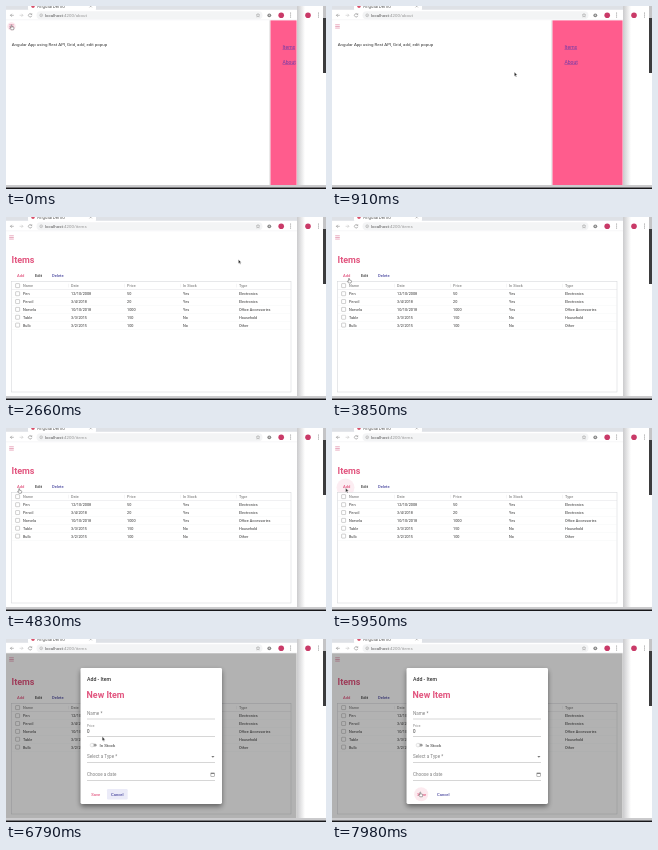
Write an HTML page that moves like this. It is 320 by 183 pixels and loops after 8000 ms.

```html
<!DOCTYPE html>
<html lang="en">
<head>
<meta charset="utf-8">
<title>Items grid</title>
<style>
html, body { margin: 0; width: 100%; height: 100%; overflow: hidden; background: #fff; }
svg { display: block; width: 100vw; height: 100vh; }
text { font-family: Roboto, "Liberation Sans", sans-serif; white-space: pre; }
</style>
</head>
<body>
<svg id="stage" viewBox="0 0 320 183" xmlns="http://www.w3.org/2000/svg"></svg>
<script>
const LOOP = 8000, STEP = 70;
const PINK = "#e2557f", INDIGO = "#4a489f", INK = "#333";

const rect = (x, y, w, h, fill, more = "") =>
  `<rect x="${x}" y="${y}" width="${w}" height="${h}" fill="${fill}" ${more}/>`;
const circle = (x, y, r, fill, more = "") =>
  `<circle cx="${x}" cy="${y}" r="${r}" fill="${fill}" ${more}/>`;
const path = (d, stroke, width = 0.6, more = "") =>
  `<path d="${d}" fill="none" stroke="${stroke}" stroke-width="${width}" ${more}/>`;
const text = (x, y, s, size, fill = INK, weight = 400, more = "") =>
  `<text x="${x}" y="${y}" font-size="${size}" fill="${fill}" font-weight="${weight}" ${more}>${s}</text>`;
const group = (id, body, more = "") => `<g id="${id}" ${more}>${body}</g>`;
const dots = x => [6.9, 9, 11.1].map(y => circle(x, y, 0.5, "#777")).join("");

function desktop() {
  return rect(0, 0, 320, 183, "#fff")
    + rect(291, 0, 8, 180, "url(#edge)")
    + circle(302, 9.3, 2.8, "#c93a68") + dots(312.5)
    + rect(317, 0, 3, 12, "#c4c4c6") + rect(317, 12, 3, 55, "#3b3b3d")
    + rect(0, 179, 320, 2.6, "#cbcbcd") + rect(0, 181.5, 320, 1.5, "#17171a");
}

function chrome() {
  return rect(0, 0, 291, 4, "#dee1e6") + rect(0, 3.8, 291, 10.4, "#fff")
    + rect(22, -3, 68, 8, "#fff", 'rx="2"')
    + circle(27, 0.2, 1.7, "#d8506a")
    + text(31, 1.6, "AngularDemo", 4.6, "#666")
    + path("M83.5 -1 l2.4 2.4 m0 -2.4 l-2.4 2.4", "#888", 0.5)
    + path("M7.8 9.3 H4.4 m1.5 -1.5 l-1.5 1.5 l1.5 1.5", "#777", 0.5)
    + path("M13.6 9.3 h3.4 m-1.5 -1.5 l1.5 1.5 l-1.5 1.5", "#bbb", 0.5)
    + path("M25.5 8.3 A1.7 1.7 0 1 0 25.8 9.7 M25.8 7.3 v1.2 h-1.3", "#777", 0.5)
    + rect(30.5, 5.2, 226, 8, "#f3f4f5", 'rx="4"')
    + circle(35.2, 9.3, 1.4, "none", 'stroke="#888" stroke-width=".4"')
    + path("M35.2 9 v1.1 M35.2 8.2 v.3", "#888", 0.4)
    + `<text x="39" y="10.9" font-size="4.4" fill="#555">localhost<tspan id="url" fill="#999"></tspan></text>`
    + path("M252 7.4 l.5 1.3 1.4 .1 -1.1 .9 .4 1.4 -1.2 -.8 -1.2 .8 .4 -1.4 -1.1 -.9 1.4 -.1 z", "#888", 0.4)
    + circle(263.3, 9.3, 1.9, "#888") + circle(263.3, 9.3, 0.7, "#ddd")
    + circle(275.2, 9.3, 2.8, "#c93a68") + dots(284.6)
    + rect(0, 13.8, 291, 0.4, "#e2e2e4");
}

function table() {
  const cols = [17, 65, 121, 177, 233];
  const rows = [
    "Pen|12/10/2008|50|Yes|Electronics",
    "Pencil|3/4/2018|20|Yes|Electronics",
    "Norvela|10/10/2018|1000|Yes|Office Accessories",
    "Table|3/3/2015|150|No|Household",
    "Bulb|3/2/2015|100|No|Other"
  ];
  const box = y => rect(9.6, y - 2, 4, 4, "#fff", 'rx=".5" stroke="#999" stroke-width=".45"');
  const line = (s, y, color, weight) => box(y)
    + s.split("|").map((c, i) => text(cols[i], y + 1.4, c, 3.8, color, weight)).join("");
  let out = rect(5.5, 64.5, 279.5, 110.5, "#fff", 'stroke="#d0d2d5" stroke-width=".5"')
    + line("Name|Date|Price|In Stock|Type", 68.6, "#888", 500)
    + rect(5.5, 72.5, 279.5, 0.4, "#d8dadd")
    + cols.slice(1).map(x => rect(x - 3, 66.8, 0.3, 3.6, "#dcdee1")).join("");
  rows.forEach((r, i) => {
    const y = 76.7 + i * 7.85;
    out += line(r, y, INK, 400) + rect(5.5, y + 3.9, 279.5, 0.25, "#ebecee");
  });
  return out;
}

function pages() {
  const home = text(5.7, 39.9, "Angular App using Rest API, Grid, add, edit popup", 4.4);
  const items = text(5.5, 46, "Items", 9, PINK, 700)
    + circle(13.5, 59.5, 9, PINK, 'id="addGlow"')
    + text(11, 60.4, "Add", 4.1, PINK, 500)
    + text(29, 60.4, "Edit", 4.1, INK, 500)
    + text(46, 60.4, "Delete", 4.1, INDIGO, 500)
    + table();
  const menu = [18.5, 20.1, 21.7].map(y => rect(3.2, y, 4.6, 0.7, "#e08aa6")).join("");
  return rect(0, 14.2, 291, 165, "#fff") + circle(5.5, 20.4, 4.2, PINK, 'id="menuGlow"')
    + menu + group("home", home) + group("items", items);
}

function sidebar() {
  const link = (y, s, w) => text(12, y, s, 5, "#6d3aa6") + rect(12, y + 0.6, w, 0.4, "#6d3aa6");
  return rect(-1.2, 14.2, 1.2, 165, "#000", 'opacity=".12"')
    + rect(0, 14.2, 71, 165, "#ff5c8d")
    + link(42.8, "Items", 12.6) + link(57.8, "About", 13);
}

function dialog() {
  const rule = y => rect(81, y, 128, 0.4, "#999");
  return rect(74.5, 31.5, 141.5, 136, "#000", 'rx="2" opacity=".45" filter="url(#soft)"')
    + rect(74.5, 29, 141.5, 136, "#fff", 'rx="1.4"')
    + text(81, 41.6, "Add - Item", 5.2, INK, 500)
    + text(80.6, 58.8, "New Item", 8.9, PINK, 700)
    + text(81, 76.1, "Name *", 4.6, "#808080")
    + text(81, 87.6, "Price", 3.3, "#808080")
    + text(81, 94.4, "0", 4.5)
    + [79.8, 97, 123, 141].map(rule).join("")
    + rect(85, 104.8, 5.6, 2.7, "#9b9b9b", 'rx="1.35"')
    + circle(86, 106.1, 1.9, "#fafafa", 'stroke="#bbb" stroke-width=".35"')
    + text(93.5, 107.7, "In Stock", 4.4)
    + text(81, 119.3, "Select a Type *", 4.6, "#808080")
    + `<path d="M205.3 117 h3.2 l-1.6 1.7 z" fill="#777"/>`
    + text(81, 137.1, "Choose a date", 4.6, "#808080")
    + rect(204.9, 134, 3.4, 3.6, "none", 'stroke="#777" stroke-width=".5"')
    + rect(204.9, 133.9, 3.4, 1, "#777")
    + circle(89.2, 155.2, 7, PINK, 'id="saveGlow"')
    + rect(101, 150, 20.7, 10.5, "#ebebf8", 'id="cancelGlow" rx="1.3"')
    + text(85.3, 156.8, "Save", 4.1, PINK, 500)
    + text(105, 156.8, "Cancel", 4.1, INDIGO, 500);
}

const arrow = `<path d="M0 0 V4.2 L1 3.4 L1.6 4.9 L2.4 4.5 L1.7 3.1 H3 Z" fill="#222" stroke="#fff" stroke-width=".4"/>`;
const hand = `<path d="M-.4 .3 Q0 -.3 .4 .3 V1.8 L2.1 2.2 Q2.6 2.5 2.5 3.1 L2 4.8 H-.4 L-1.6 3.1 Q-1.5 2.5 -.9 2.7 L-.4 3.1 Z" fill="#fff" stroke="#444" stroke-width=".45"/>`;

const stage = document.getElementById("stage");
stage.innerHTML = `<defs>
  <linearGradient id="edge"><stop stop-color="#cbcbcd"/><stop offset="1" stop-color="#fff"/></linearGradient>
  <filter id="soft" x="-20%" y="-20%" width="140%" height="140%"><feGaussianBlur stdDeviation="2.4"/></filter>
  <clipPath id="view"><rect y="14.2" width="290.6" height="164.8"/></clipPath></defs>`
  + desktop() + chrome()
  + group("page", pages() + group("side", sidebar())
    + group("status", rect(0, 173.5, 37, 6, "#e4e5e8", 'rx=".8"') + text(1.5, 177.9, "localhost:4200/items", 3.7, "#555"))
    + rect(0, 14, 291, 166, "#000", 'id="shade"') + group("dialog", dialog()), 'clip-path="url(#view)"')
  + group("cursor", group("arrow", arrow) + group("hand", hand));

const el = {};
stage.querySelectorAll("[id]").forEach(n => el[n.id] = n);

const clamp = v => Math.max(0, Math.min(1, v));
const span = (t, a, b) => clamp((t - a) / (b - a));
const show = (id, on) => el[id].setAttribute("display", on ? "inline" : "none");
const fade = (id, v) => el[id].setAttribute("opacity", v);
const move = (id, x, y) => el[id].setAttribute("transform", `translate(${x} ${y})`);

// cubic-bezier(.25, .8, .25, 1), solved by bisection
function swift(p) {
  let lo = 0, hi = 1;
  for (let i = 0; i < 18; i++) {
    const s = (lo + hi) / 2;
    if (0.75 * s * (1 - s) + s ** 3 < p) lo = s; else hi = s;
  }
  const r = 1 - lo;
  return 2.4 * lo * r * r + 3 * lo * lo * r + lo ** 3;
}

// time, x, y of the pointer tip
const trail = [
  [0, 5.5, 19], [630, 174.5, 66.5], [840, 174.5, 66.5], [910, 182.3, 66],
  [1330, 238.5, 57], [1400, 238.5, 57], [1890, 238, 42], [2310, 238, 42],
  [2800, 231, 42.5], [3150, 16, 61], [3500, 16, 61], [3850, 17, 61.2],
  [4200, 36, 61], [4340, 36, 61], [4900, 12.2, 60.4], [4970, 12.2, 60.4],
  [5180, 13.6, 60], [6090, 13.6, 60], [6510, 97, 81], [6720, 97, 81],
  [6790, 96.2, 97.6], [7560, 88, 151.5], [7700, 88.3, 153], [8000, 88.3, 153]
];

function pointer(t) {
  const i = trail.findIndex(k => k[0] > t);
  const [a, b] = [trail[i - 1], trail[i]];
  const p = span(t, a[0], b[0]), e = p * p * (3 - 2 * p);
  return [a[1] + (b[1] - a[1]) * e, a[2] + (b[2] - a[2]) * e];
}

function ripple(id, p, radius, strength) {
  el[id].setAttribute("r", radius * (0.4 + 0.6 * p));
  fade(id, strength);
}

function draw(t) {
  const onItems = t >= 2030;
  el.url.textContent = onItems ? ":4200/items" : ":4200/about";
  show("home", !onItems);
  show("items", onItems);
  fade("menuGlow", 0.14 * (1 - span(t, 0, 420)));

  const open = swift(span(t, -46, 354)) - swift(span(t, 2274, 2674));
  move("side", 290.5 - 70 * open, 0);
  show("side", open > 0.002);
  show("status", t >= 1540 && t < 2660);

  const add = span(t, 5670, 5950), save = span(t, 7770, 7980);
  ripple("addGlow", add, 9, 0.1 * add * (1 - span(t, 6090, 6400)));
  ripple("saveGlow", save, 7, 0.12 * save);
  fade("cancelGlow", 1 - span(t, 7770, 7910));

  fade("shade", 0.3 * swift(span(t, 6050, 6450)));
  const pop = swift(span(t, 6050, 6260)), zoom = 0.7 + 0.3 * pop;
  el.dialog.setAttribute("transform", `translate(145.25 97) scale(${zoom}) translate(-145.25 -97)`);
  fade("dialog", pop);

  const link = t < 140 || (t >= 1610 && t < 2310) || (t >= 3150 && t < 5040) || t >= 7560;
  move("cursor", ...pointer(t));
  show("hand", link);
  show("arrow", !link);
}

const start = performance.now();
function tick() {
  const t = (performance.now() - start) % LOOP;
  draw(Math.floor(t / STEP) * STEP);
  requestAnimationFrame(tick);
}
tick();
</script>
</body>
</html>
```
